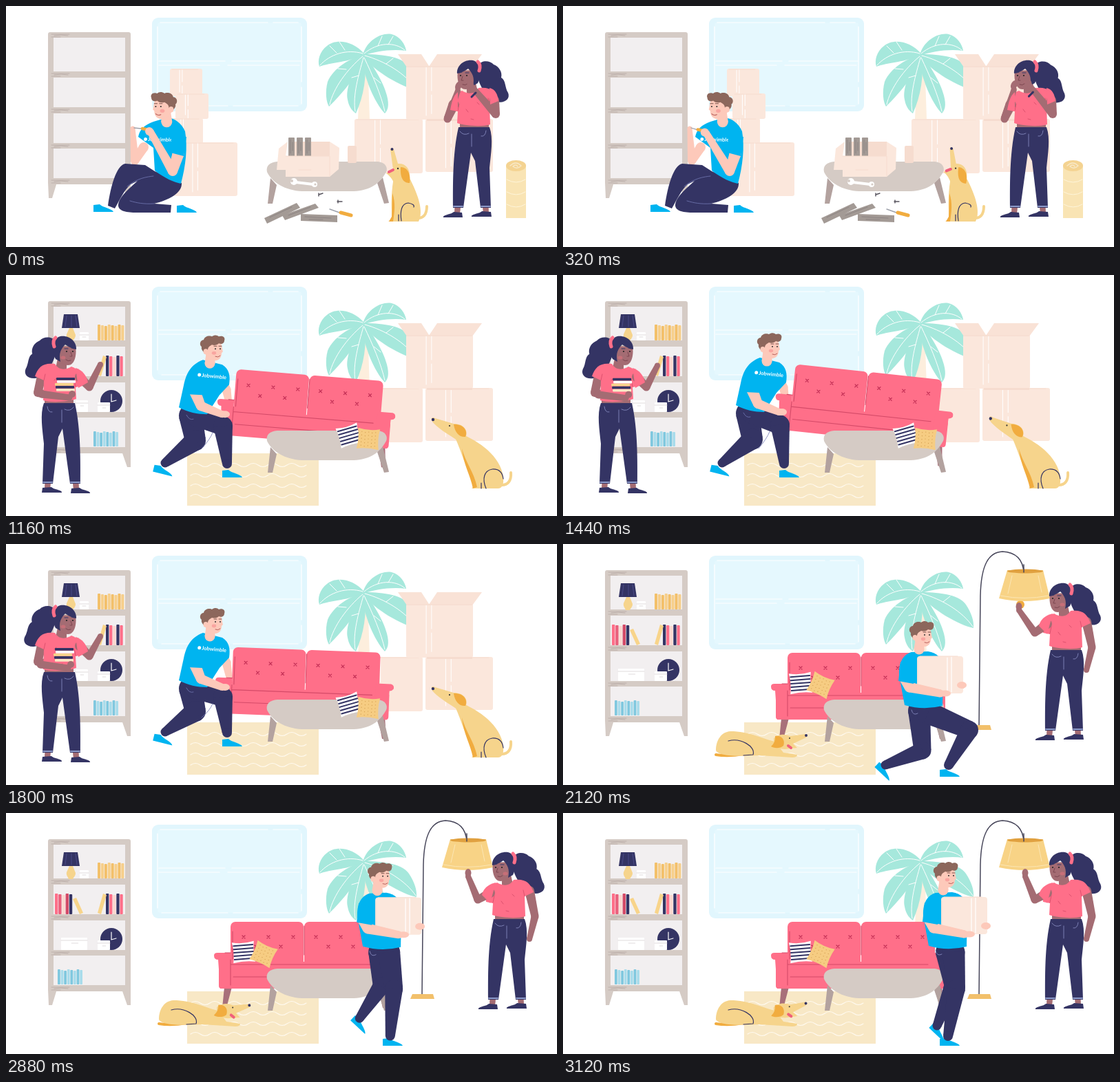
These frames come from a looping animation (800 px wide and 350 px high, 3160 ms). An HTML page with a canvas:

```html
<!DOCTYPE html>
<html lang="en">
<head>
<meta charset="utf-8">
<title>Moving in</title>
<style>
html, body { margin: 0; width: 100%; height: 100%; overflow: hidden; background: #fff; }
canvas { display: block; }
</style>
</head>
<body>
<canvas id="stage" width="800" height="350"></canvas>
<script>
const g = document.getElementById('stage').getContext('2d');
const NAVY = '#343464', PINK = '#ff6f89', BLUE = '#00b4f0', SKIN = '#fdc9ba', TAN = '#a46c73',
  WOOD = '#d5cbc5', BOX = '#fbe7dc', BOX2 = '#f6dccf', MINT = '#a6e8dc', SAND = '#f8e8c6',
  GOLD = '#f6d48c', AMBER = '#f1ac3f', GREY = '#a39a95', PALE = '#f2eff0', HAIR = '#8c675c', ROSE = '#d44a68';
const LOOP = 3160, CUT1 = 1060, CUT2 = 2100;

// drawing helpers
const fill = (c, d) => { g.fillStyle = c; g.fill(new Path2D(d)); };
const line = (c, w, d) => {
  g.strokeStyle = c; g.lineWidth = w; g.lineCap = g.lineJoin = 'round';
  g.stroke(new Path2D(d));
};
const rect = (c, x, y, w, h, r = 0) => {
  g.fillStyle = c; g.beginPath(); g.roundRect(x, y, w, h, r); g.fill();
};
const oval = (c, x, y, rx, ry = rx, a = 0) => {
  g.fillStyle = c; g.beginPath(); g.ellipse(x, y, rx, ry, a, 0, 7); g.fill();
};
const at = (x, y, draw, turn = 0, flip = 1) => {
  g.save(); g.translate(x, y); g.rotate(turn); g.scale(flip, 1); draw(); g.restore();
};
const pivot = (x, y, turn, draw) => at(x, y, () => at(-x, -y, draw), turn);
const mix = (a, b, k) => a + (b - a) * k;
const blend = (a, b, k) => a.map((v, i) => mix(v, b[i], k));
const ease = (t, a, b) => {
  const k = Math.min(1, Math.max(0, (t - a) / (b - a)));
  return k * k * (3 - 2 * k);
};
const wave = (t, period) => (1 - Math.cos(2 * Math.PI * t / period)) / 2;

// tapered limb through joints p = [x, y, ...] with widths w
function limb(c, p, w) {
  for (let i = 0; i < w.length; i++) {
    const [x, y, u, v] = p.slice(2 * i, 2 * i + 4), a = w[i] / 2, b = w[i + 1] / 2;
    oval(c, x, y, a);
    if (u === undefined) break;
    const n = Math.atan2(v - y, u - x) + Math.PI / 2, cx = Math.cos(n), cy = Math.sin(n);
    fill(c, `M${x + cx * a},${y + cy * a}L${u + cx * b},${v + cy * b}L${u - cx * b},${v - cy * b}L${x - cx * a},${y - cy * a}Z`);
  }
}

function label(x, y, turn) {
  at(x, y, () => {
    oval('#fff', 2.5, -2.5, 2.5);
    g.fillStyle = '#fff';
    g.font = 'bold 7.5px Lato, Inter, sans-serif';
    g.fillText('Jobwimble', 6, 0);
  }, turn);
}

function carton(x, y, w, h) {
  rect(BOX, x, y, w, h, 3);
  line('#fff', 1, `M${x + w * .3},${y + 2}v${h - 8}M${x + w * .38},${y + 1}v${h * .45}m0,6v${h * .35}`);
  line(BOX2, 1, `M${x + 3},${y + 1}H${x + w - 6}`);
}

function room() {
  rect('#e1f6fd', 212, 17, 225, 136, 9);
  rect('#e5f8fe', 220, 24, 209, 121, 3);
  line('#fff', 1.2, 'M220,138V30M224,24H380M388,24H424M429,30V110M429,118V142M424,145H330M322,145H226M222,80H318M328,80H428M222,86H310M322,86H426');
}

function plant() {
  fill('#fdeedd', 'M515,75L511,164H528L525,75Z');
  [ 'M519,68C505,52 480,46 466,58C455,66 452,80 455,88C470,82 500,82 519,70Z',
    'M519,68C525,50 545,38 560,41C572,44 580,56 581,65C560,62 535,66 519,72Z',
    'M519,70C540,70 575,72 585,88C593,100 597,112 596,122C575,118 535,95 519,74Z',
    'M519,70C500,76 475,90 467,110C463,125 465,140 469,146C485,130 512,100 520,76Z',
    'M519,70C505,90 492,120 496,136C498,148 504,153 508,156C520,130 524,100 521,74Z',
    'M520,70C532,85 548,110 553,130C557,145 554,152 550,156C535,140 520,105 517,76Z'
  ].forEach(d => fill(MINT, d));
  line('#fff', 1, 'M518,69C495,62 470,70 456,86M520,69C540,52 565,52 579,64M521,72C550,80 580,98 595,120M518,73C495,92 475,120 470,143M519,75C512,100 503,130 507,153M520,75C532,100 545,130 550,153M492,64L484,52M480,68L470,58M540,58L546,44M555,56L562,44M552,84L562,76M494,92L482,91M512,101L502,104M534,104L544,112');
}

function cartons() {
  carton(506, 164, 99, 79);
  carton(609, 164, 98, 77);
  carton(581, 87, 97, 78);
  fill('#f9e2d6', 'M569,70L603,70L614,87L582,89ZM626,70L691,70L677,89L614,88Z');
  line(BOX2, 1, 'M582,88H677');
  rect(BOX2, 611, 164, 66, 3);
}

function shelf() {
  rect(WOOD, 61, 38, 120, 221, 3);
  fill(WOOD, 'M61,256H74L67,279H62ZM168,256H181V279H176Z');
  [[46, 49], [104, 43], [156, 43], [207, 43]].forEach(([y, h]) => rect(PALE, 69, y, 104, h));
  [41, 98, 150, 202, 253].forEach(y =>
    line('#b7a9a4', .8, `M66,${y}h26m-22,2q10,-2 20,0m-24,2h13`));
}

const books = (cols, n, x, y, w, h) => {
  for (let i = 0; i < n; i++)
    rect(cols[i % cols.length], x + i * w, y + i * 7 % 3, w - .8, h - i * 7 % 3, 1);
};

function shelved(left) {
  fill(GOLD, 'M92,77H97L101,87C101,92 98,93 97,96H91C90,92 87,91 88,86Z');
  fill(NAVY, 'M84,57H104L107,77H81Z');
  line('#555494', .7, 'M88,59l-2,16M95,59v16M101,59l2,16');
  rect('#fff', 107, 83, 13, 12, 1);
  line('#d9d2d3', .8, 'M107,87h13M111,90h5');
  books(['#f3c06a', '#f7cf8b'], 8, 133, 72, 4.9, 23);
  books([NAVY, PINK, '#fbd7cf'], 5, 145, 117, 5.1, 30);
  fill('#f8d48a', 'M141,117L146,119L138,147L133,145Z');
  oval(NAVY, 153, 183, 16);
  line('#fff', 1.2, 'M153,173V184L160,182');
  const lidded = (x, y, w) => {
    rect('#fff', x, y, w, 199 - y, 1);
    line('#d9d2d3', .8, `M${x},${y + 4}h${w}m${-w * .6},4h${w * .25}`);
  };
  lidded(133, 185, 18);
  if (left) lidded(80, 181, 38);
  else lidded(101, 182, 18);
  books(['#80c8df', '#a9dceb'], 8, left ? 75 : 127, 227, 4.6, 22);
  if (left) {
    books([PINK, '#e9607c', '#fbd7cf', ROSE, NAVY], 5, 71, 117, 5.2, 30);
    fill('#f8d48a', 'M97,125L102,123L112,145L107,147Z');
  }
}

function table() {
  fill('#b3a29f', 'M384,250L393,260L387,287H380ZM539,257L547,249L556,286L549,287Z');
  fill(WOOD, 'M394,226H540C550,227 555,234 552,241C543,258 528,268 505,269H430C405,268 386,256 379,241C377,232 383,227 394,226Z');
}

function rug() {
  rect(SAND, 263, 259, 191, 76);
  for (let y = 276; y < 330; y += 15)
    line('#fffaf0', 1.1, `M268,${y}` + 'q7,-5 14,0t14,0'.repeat(6));
}

function sofa() {
  fill('#a8707a', 'M317,253H328L320,283H314ZM540,253H550L553,283H547Z');
  rect(PINK, 326, 158, 106, 72, 7);
  rect(PINK, 433, 158, 107, 72, 7);
  rect(PINK, 309, 216, 246, 39, 4);
  fill(PINK, 'M302,207Q302,203 307,203H326V255H311L308,213Q302,213 302,207ZM535,203H557Q562,204 561,210Q559,213 555,213L553,255H535Z');
  line(ROSE, 1.1, 'M433,164V206M329,212V172M326,220H530M330,238H528M326,213V250M318,203H326');
  [0, 105].forEach(dx => {
    [[345, 180], [381, 180], [417, 180], [363, 194], [399, 194]].forEach(([x, y]) =>
      line('#c22f55', 1.2, `M${x + dx - 2},${y - 2}l4,4m-4,0l4,-4`));
  });
}

function cushion(x, y, turn, striped) {
  at(x, y, () => {
    fill(striped ? '#fff' : '#f6cc82', 'M-16,-15Q0,-11 16,-15Q13,0 16,15Q0,12 -16,15Q-13,0 -16,-15Z');
    for (let i = -10; i < 13; i += 5) {
      if (striped) line(NAVY, 2, `M-14,${i}H14`);
      else for (let j = -10; j < 13; j += 5) oval('#cf9a4c', j, i + (j & 1), .6);
    }
  }, turn);
}

// woman facing left; arms and extras are drawn by the caller in the same space
function woman(t, x, y, flip, back, front) {
  at(x, y, () => {
    pivot(686, 88, .025 * Math.sin(t / 170), () =>
      fill(NAVY, 'M686,86C690,78 703,79 708,85C716,88 721,96 719,104C726,108 724,118 729,126C733,136 722,143 709,138C699,134 694,126 690,117C685,108 683,97 686,86Z'));
    back();
    limb(TAN, [656, 288, 655, 302], [9, 8]);
    limb(TAN, [696, 288, 697, 301], [9, 8]);
    fill(NAVY, 'M635,307C634,303 646,303 650,299L662,300L663,307ZM676,306C675,302 687,302 691,298L704,299L705,306Z');
    rect(TAN, 659, 166, 42, 14);
    fill(NAVY, 'M657,176L702,176C708,192 704,215 702,235L704,293H689L681,225L675,213L664,293H649C649,262 648,215 657,176Z');
    line('#8f9ccb', 2, 'M650,291H663M690,291H703');
    line('#8e93c8', .8, 'M659,182q5,7 13,3M697,181q-1,9 -7,8M676,186v18');
    limb(TAN, [675, 110, 677, 126], [13, 16]);
    fill(PINK, 'M662,123C674,130 682,126 686,119C703,117 710,123 715,137L702,143L703,172C690,176 668,174 655,170L656,153L646,151C645,138 650,127 662,123Z');
    line(ROSE, .8, 'M656,152L658,142M702,143L700,134M668,150l3,4M684,140l3,3M675,164l4,1');
    fill(TAN, 'M656,94C654,108 658,121 667,121C678,120 684,108 683,93Z');
    oval('#c66f78', 674, 110, 3.5, 2.5);
    oval('#222', 660, 101, 1.1); oval('#222', 669, 101, 1.1);
    line(NAVY, 1, 'M658,97l4,-1M667,97l5,0');
    line('#7c4650', 1, 'M663,102l-2,6h3M663,114q4,2 7,-1');
    fill(NAVY, 'M655,98C654,86 666,77 678,79C690,82 691,100 685,112L678,116C681,104 677,97 671,91C667,94 661,97 655,98Z');
    line(PINK, 5, 'M685,81Q690,86 687,94');
    front();
  }, 0, flip);
}

// man's head facing right, centred on (x, y)
function head(x, y, flip = 1, k = 1) {
  at(x, y, () => {
    g.scale(k, k);
    limb(SKIN, [-4, 8, -5, 21], [13, 15]);
    fill(SKIN, 'M-11,-9L11,-9C13,-3 13,2 14,4L12,6C12,12 9,16 4,17C-4,17 -10,13 -12,6Z');
    fill(HAIR, 'M-13,6C-15,3 -18,1 -17,-3C-21,-6 -19,-13 -14,-13C-13,-19 -5,-20 -2,-18C2,-21 6,-20 8,-18C13,-20 18,-17 16,-12C16,-8 12,-6 8,-8C5,-5 1,-5 -2,-6C-5,-4 -8,-3 -8,2L-11,6Z');
    oval(SKIN, -11, 4, 3.5, 4);
    oval('#f9a5a0', 1, 6, 3.2, 2.4);
    oval('#333', 3, 0, 1); oval('#333', 10, 0, 1);
    line('#7a544c', 1, 'M1,-4h4M8,-4h4');
    line('#b9605c', 1, 'M3,11q4,2 7,-1');
  }, 0, flip);
}

const shoe = (x, y, turn = 0) => at(x, y, () =>
  fill(BLUE, 'M-14,5L-14,-5L-5,-6C0,-1 13,0 15,5Z'), turn);

function fitting(t) {
  const p = wave(t, 480), q = wave(t, 1440);
  room();
  carton(238, 91, 47, 40); carton(246, 127, 48, 37);
  carton(240, 163, 46, 37); carton(243, 198, 93, 78);
  plant(); cartons(); shelf(); table();
  // tools and parts
  rect(BOX2, 496, 203, 13, 25, 2);
  fill(BOX2, 'M410,197H470V230H410Z');
  [410, 422, 434].forEach(x => {
    rect(GREY, x, 191, 9, 29, 1);
    line('#82797a', .7, `M${x + 3},194v20m3,-16v12`);
  });
  fill(BOX, 'M406,218H470V248H406ZM409,197L396,207L393,238L406,238V218ZM470,197L484,206L483,237L470,248Z');
  line(BOX2, 1, 'M406,218H470V247M425,238h18');
  line('#fff', 4, 'M421,256L446,259');
  oval('#fff', 418, 255, 5); oval('#fff', 448, 259, 4);
  oval(WOOD, 415, 254, 2); oval(WOOD, 449, 259, 1.6);
  line('#55525c', 1.4, 'M454,274l6,-2M481,284l7,0M454,272v4M482,282v4');
  ['M375,308L422,286L427,293L379,316Z', 'M401,304L449,287L454,293L405,311Z', 'M428,302L481,304V314L428,312Z']
    .forEach(d => fill(GREY, d));
  line('#82797a', .7, 'M383,307L415,292M410,304L442,292M434,306L472,308M440,310h20');
  line('#9da1ab', 1.4, 'M470,295L484,300');
  line(AMBER, 5, 'M486,300L501,304');
  // rolled rug
  rect('#f9e4b4', 726, 232, 29, 76);
  oval('#f4d391', 740.5, 232, 14.5, 8);
  line(SAND, 1.5, 'M732,232q8,-8 16,0q-6,6 -12,1q4,-4 7,0');
  line('#fff5da', 1, 'M727,252q14,8 27,0M727,270q14,8 27,0M727,288q14,8 27,0');
  // dog
  line(GOLD, 4, 'M596,307C606,310 611,302 611,291');
  fill(GOLD, 'M564,244C559,268 559,290 561,308L555,313H599C607,298 598,274 587,252Z');
  fill(AMBER, 'M561,272C566,286 564,300 562,313H556L560,306Z');
  line(NAVY, 1.2, 'M574,312C572,298 574,287 584,286Q594,288 592,292M570,312V303');
  pivot(574, 248, p * .12, () => {
    fill(GOLD, 'M558,208Q560,205 563,208L569,229C580,228 586,236 586,246L584,262L564,258C561,252 558,247 552,243L562,237Z');
    line('#f0607b', 4, 'M562,238L556,241');
    oval(NAVY, 560.5, 208, 2);
    oval('#333', 569, 236, 1.2);
    fill(AMBER, 'M573,234C584,234 588,246 586,257C578,257 572,252 573,234Z');
  });
  // woman, hands to her face
  woman(t, 0, 0, 1, () => {}, () => {
    limb(TAN, [650, 143, 641, 164, 656 - 3 * q, 123 - 4 * q], [15, 11, 8]);
    limb(TAN, [709, 137, 711, 157, 677 + 2 * q, 118 - 5 * q], [14, 12, 8]);
    oval(TAN, 657 - 5 * q, 116 - 3 * q, 4.5, 7, .4);
    oval(TAN, 674 + 4 * q, 113 - 4 * q, 4.5, 7, -.4);
    line(NAVY, 3, `M${676 + q},${132 - 2 * q}l6,-6`);
    fill(PINK, 'M702,119C711,121 714,129 715,138L703,143ZM656,125C649,131 647,140 645,151L656,153Z');
  });
  // man with a screwdriver
  limb(SKIN, [200, 205, 187, 225, 184, 178], [14, 12, 7]);
  shoe(141, 294); shoe(262, 295);
  fill(NAVY, 'M202,231L173,229C160,232 152,262 148,290L158,294C165,282 171,268 181,259L191,254C178,266 163,278 163,290C164,298 175,300 190,300H239L240,289L215,287C236,282 256,272 255,257L216,240Z');
  line('#7379b4', .8, 'M176,262C190,250 205,248 214,247M215,287C200,288 190,286 180,283');
  fill(BLUE, 'M214,168C200,173 194,180 192,190L214,206L216,239C230,250 244,256 254,258C261,232 264,205 260,182C255,170 245,163 234,162Z');
  label(200 - p, 196, .02);
  head(228 - 2 * p, 146, -1, 1.06);
  const hy = 183 + 2 * p, hx = 208 - 3 * p;
  line('#9da1ab', 1.3, `M186,177L${hx - 12},${hy - 5}`);
  line(AMBER, 4.5, `M${hx - 10},${hy - 5}L${hx},${hy - 3}`);
  limb(SKIN, [250, 215, 242, 240, hx + 2, hy], [17, 14, 10]);
  oval(SKIN, hx, hy - 1, 6);
  fill(BLUE, 'M240,190L239,213L258,218L262,190Z');
}

function arranging(t) {
  const lift = Math.max(0, 4 * Math.sin(Math.PI * (t - 1000) / 760)), dy = -2.3 * lift, q = wave(t - 1160, 1280);
  room(); plant(); cartons(); shelf(); shelved(false); rug();
  // dog
  line(GOLD, 4, 'M718,305C729,306 734,298 733,287');
  fill(GOLD, 'M655,228C680,238 714,258 721,288C724,303 721,310 714,310H676L682,304C668,284 662,258 652,236Z');
  fill(AMBER, 'M662,252C667,272 679,285 684,308L678,310C674,290 664,275 662,252Z');
  line(NAVY, 1.2, 'M697,310C691,296 694,284 706,282Q720,281 722,296M690,310V302');
  pivot(658, 230, .04 * Math.sin((t - 1160) / 200), () => {
    fill(GOLD, 'M618,208Q620,206 623,208L650,216C664,216 671,225 668,234L655,240C640,230 626,222 619,213Z');
    oval(NAVY, 620, 210, 2.2);
    oval('#333', 644, 219, 1.1);
    fill(AMBER, 'M650,217C664,216 671,226 667,235C659,236 652,230 650,217Z');
  });
  // woman with books
  woman(t, 757, 10, -1, () => limb(TAN, [704, 132, 711, 161, 670, 168], [14, 12, 9]), () => {
    limb(TAN, [650, 138, 636, 153, 620, 120 + 4 * q], [14, 11, 8]);
    fill(PINK, 'M656,125C646,128 640,136 638,146L652,154Z');
  });
  at(-2 * q, 2 * q, () => {
    [[NAVY, 73], ['#fff', 74], [GOLD, 71], [NAVY, 72], [SAND, 73]].forEach(([c, x], i) => rect(c, x, 149 + i * 4, 27, 3.7, 1));
    limb(TAN, [52, 173, 92, 178], [11, 9]);
    oval(TAN, 96, 173, 5);
  });
  // man lifting the sofa
  limb(SKIN, [308, 155 + dy, 320, 172 + dy, 324, 194 + dy], [16, 13, 9]);
  at(0, -1.5 * lift, () => pivot(546, 258, (2.2 + lift) * Math.PI / 180, sofa));
  table();
  cushion(498, 233, -.28, true);
  cushion(526, 238, .08, false);
  shoe(228, 284, .24); shoe(328, 289);
  limb(NAVY, [268, 210 + dy, 275, 243 + dy / 2, 231, 273], [34, 30, 13]);
  limb(NAVY, [275, 210 + dy, 315, 222 + dy / 2, 321, 274], [30, 28, 14]);
  line('#7379b4', .8, `M262,${209 + dy}q4,8 10,6M300,${232 + dy / 2}Q296,${242 + dy / 2} 284,252`);
  at(0, dy, () => {
    fill(BLUE, 'M286,129C268,136 262,148 258,166L251,198C264,205 278,208 292,208L310,180L324,165C326,152 324,142 314,136Z');
    label(278, 153, .1);
    head(301, 113);
    limb(SKIN, [273, 172, 283, 196, 314, 208], [17, 14, 10]);
    oval(SKIN, 318, 208, 7, 5);
    fill(BLUE, 'M263,150L264,179L285,180L284,156Z');
  });
}

function settled(t) {
  const rise = ease(t, 2120, 2540), walk = ease(t, 2560, 3120), reach = ease(t, 2120, 2440);
  room(); plant(); shelf(); shelved(true); rug(); sofa();
  cushion(345, 202, -.08, true);
  cushion(374, 205, .42, false);
  table();
  // dog lying down
  line(AMBER, 4, 'M222,306Q240,309 262,305');
  fill(GOLD, 'M222,300C222,286 229,273 243,272C270,272 290,283 308,287L320,303L340,306Q340,310 333,310L285,307C265,308 228,310 222,300Z');
  line(NAVY, 1.2, 'M240,286C258,281 280,294 276,306L262,307');
  pivot(312, 288, .04 * Math.sin((t - 2120) / 90), () => {
    fill(GOLD, 'M306,282C316,274 324,277 330,279L352,276Q356,278 353,281L334,290L340,296L322,298L306,296Z');
    line('#f0607b', 4, 'M327,293L331,296');
    oval(NAVY, 353, 278, 2);
    oval('#333', 329, 282, 1);
    fill(AMBER, 'M308,279C318,277 323,285 320,293C314,298 305,296 302,294Q309,288 308,279Z');
  });
  // woman fitting a bulb
  const hand = blend([662, 92], [671, 88], reach);
  line('#47465a', 1.5, 'M604,265L606,75C607,30 618,12 638,11C658,12 668,22 669,42');
  fill('#f2c06b', 'M590,263H620L622,270H587Z');
  oval(AMBER, hand[0] + 2, hand[1] - 4 - 10 * reach, 6);
  fill('#f8d386', 'M645,38H697L707,79Q670,87 633,79Z');
  oval('#e0a03f', 671, 39.5, 26, 3);
  line('#fce6b4', 1, 'M635,75Q670,82 705,75M652,46l-6,26M690,46l5,24');
  line('#47465a', 1.5, 'M669,30V41');
  woman(t, 51, -22, 1, () => limb(TAN, [709, 135, 717, 172, 709, 205], [14, 11, 8]), () => {
    limb(TAN, [652, 138, 634, 151 - 3 * reach, hand[0] - 51, hand[1] + 26], [14, 11, 8]);
    oval(TAN, hand[0] - 51, hand[1] + 21, 4.5, 6);
    fill(PINK, 'M660,123C648,126 642,132 640,141L652,153Z');
  });
  // man with a carton
  const pose = (a, b, c) => blend(blend(a, b, rise), c, walk);
  const rear = pose([517, 242, 522, 300, 468, 321], [519, 202, 513, 252, 467, 315], [557, 202, 566, 250, 543, 309]);
  const lead = pose([530, 245, 590, 270, 560, 321], [538, 202, 551, 255, 556, 323], [567, 202, 571, 255, 559, 324]);
  rear[5] -= 14 * Math.sin(Math.PI * walk);
  shoe(rear[4] - 2 + 4 * walk, rear[5] + 9, .75);
  limb(NAVY, rear, [32, 25, 13]);
  shoe(561, 333);
  limb(NAVY, lead, [33, 26, 14]);
  const [dx, dy] = pose([-2, 39], [0, 0], [33, -2]);
  at(dx, dy, () => {
    line('#8e93c8', .8, 'M508,202q2,9 9,5');
    fill(BLUE, 'M508,118C494,122 489,136 490,152L498,195Q525,203 553,196L554,140C552,126 545,119 532,117Z');
    head(524, 93);
    limb(SKIN, [560, 172, 581, 167], [12, 9]);
    rect(BOX, 516, 124, 67, 54, 4);
    line('#fff', 1.2, 'M560,126v48M566,125v51');
    line(BOX2, 1, 'M517,130v40M520,124h55');
    limb(SKIN, [500, 158, 505, 169, 550, 178], [17, 15, 11]);
    oval(SKIN, 557, 178, 8, 4.5);
    oval(SKIN, 581, 166, 7, 5);
    fill(BLUE, 'M492,132L489,160L511,164L514,140Z');
  });
}

function frame() {
  const t = performance.now() % LOOP;
  g.fillStyle = '#fff';
  g.fillRect(0, 0, 800, 350);
  (t < CUT1 ? fitting : t < CUT2 ? arranging : settled)(t);
  requestAnimationFrame(frame);
}
frame();
</script>
</body>
</html>
```
